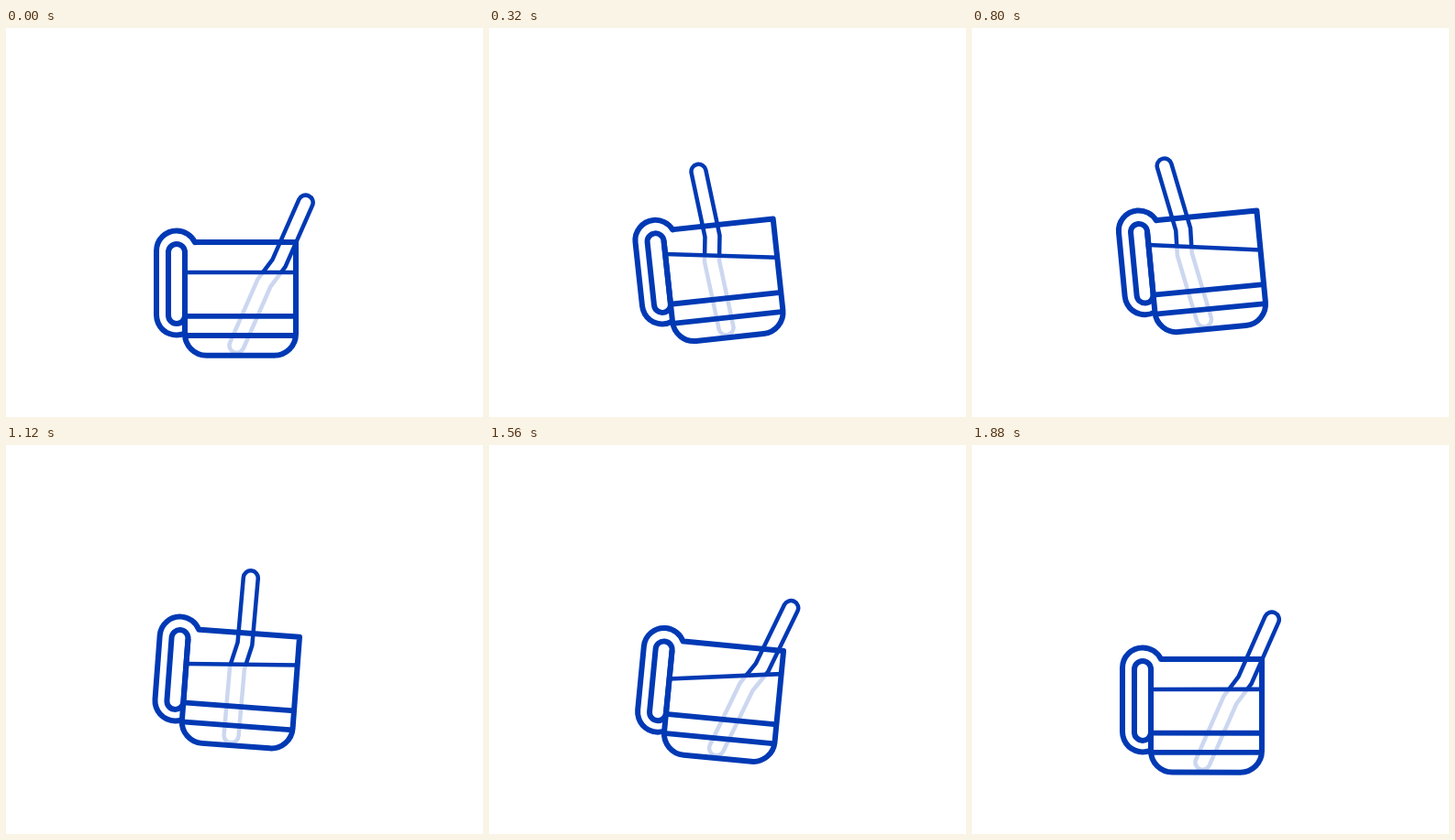
An HTML page with a canvas that plays this animation: 520 by 425 pixels, repeating every 2400 ms.

```html
<!DOCTYPE html>
<html lang="en">
<head>
<meta charset="utf-8">
<title>Stirred mug</title>
<style>
html, body { margin: 0; width: 100%; height: 100%; overflow: hidden; background: #fff; }
canvas { display: block; width: 520px; height: 425px; }
</style>
</head>
<body>
<canvas id="stage" width="520" height="425"></canvas>
<script>
const ctx = document.getElementById('stage').getContext('2d');
const LOOP = 2400, STEP = 40;
const BLUE = '#0039b4', PALE = '#ccd7f0';
const LEFT = 195, RIGHT = 316, MID = 255.5, PIVOT = 290;
const RIM = 234, BASE = 357.7;

const rad = deg => deg * Math.PI / 180;

// Eases from 0 to 1 between two times.
function ease(t, from, to) {
  const u = Math.min(1, Math.max(0, (t - from) / (to - from)));
  return u * u * (3 - 2 * u);
}

function pose(t) {
  const rise = ease(t, 0, 520);
  const raised = rise - ease(t, 1240, 1900);
  const back = ease(t, 800, 1560), settle = ease(t, 1560, 1900);
  return {
    lift: -28.9 * raised,
    tilt: -9.15 * rise + 17.1 * ease(t, 560, 1360) - 7.95 * ease(t, 1360, 1900),
    level: 267 + 1.6 * raised,
    slosh: 2.6 * rise - 5.1 * back + 2.5 * settle,
    spoonX: 251.5 + 1.4 * rise - 5.4 * ease(t, 520, 800) + 6 * back - 2 * settle,
    // stir left, drift to the middle, flick right, then come to rest
    spoonTilt: 25.7 - 54.6 * ease(t, 0, 530) + 29.7 * ease(t, 520, 1090)
      + 33 * ease(t, 1020, 1380) - 5.9 * ease(t, 1380, 1540) - 2.2 * ease(t, 1680, 1900)
  };
}

function stroke(width, color = BLUE) {
  ctx.lineWidth = width;
  ctx.strokeStyle = color;
  ctx.stroke();
}

function line(y0, y1, width) {
  ctx.beginPath();
  ctx.moveTo(LEFT, y0);
  ctx.lineTo(RIGHT, y1);
  stroke(width);
}

// The part of the spoon between the liquid surface and a far edge.
function spoon(x, angle, y0, y1, edge, color) {
  const reach = 400, k = (y1 - y0) / (RIGHT - LEFT);
  ctx.save();
  ctx.beginPath();
  ctx.moveTo(LEFT - reach, y0 - k * reach);
  ctx.lineTo(RIGHT + reach, y1 + k * reach);
  ctx.lineTo(RIGHT + reach, edge);
  ctx.lineTo(LEFT - reach, edge);
  ctx.clip();
  ctx.translate(x, 346.8);
  ctx.rotate(angle);
  ctx.lineCap = 'round';
  ctx.lineJoin = 'miter';
  ctx.beginPath();
  ctx.moveTo(0, 0);
  ctx.lineTo(-2.7, -74.4);
  ctx.lineTo(2.5, -101);
  ctx.lineTo(0, -173.3);
  stroke(20.5, color);
  stroke(11.5, '#fff');
  ctx.restore();
}

function mug() {
  ctx.lineCap = 'butt';
  ctx.lineJoin = 'round';

  // Outer handle and body
  ctx.beginPath();
  ctx.moveTo(LEFT, 333.5);
  ctx.arc(186, 313.5, 22, rad(66), Math.PI);
  ctx.arc(186, 243.5, 22, Math.PI, rad(-25));
  ctx.lineTo(207, RIM);
  ctx.lineTo(RIGHT, RIM);
  ctx.arcTo(RIGHT, BASE, MID, BASE, 23.5);
  ctx.arcTo(LEFT, BASE, LEFT, 300, 23.5);
  ctx.lineTo(LEFT, 245);
  stroke(6);

  // Handle opening
  ctx.beginPath();
  ctx.arc(186, 245, 9, Math.PI, 0);
  ctx.arc(186, 314, 9, 0, Math.PI);
  ctx.closePath();
  stroke(6);

  for (const y of [314.8, 336]) line(y, y, 5.8);
}

function draw(t) {
  const p = pose(t);
  ctx.fillStyle = '#fff';
  ctx.fillRect(0, 0, 520, 425);
  ctx.save();
  ctx.translate(MID, PIVOT + p.lift);
  ctx.rotate(rad(p.tilt));
  ctx.translate(-MID, -PIVOT);

  const half = (RIGHT - MID) * Math.tan(rad(p.slosh - p.tilt));
  const y0 = p.level - half, y1 = p.level + half;
  const angle = rad(p.spoonTilt - p.tilt);
  spoon(p.spoonX, angle, y0, y1, 900, PALE);
  spoon(p.spoonX, angle, y0, y1, -500, BLUE);
  mug();
  line(y0, y1, 4.6);
  ctx.restore();
}

const start = performance.now();
function tick() {
  const t = (performance.now() - start) % LOOP;
  draw(Math.floor(t / STEP) * STEP);
  requestAnimationFrame(tick);
}
tick();
</script>
</body>
</html>
```
